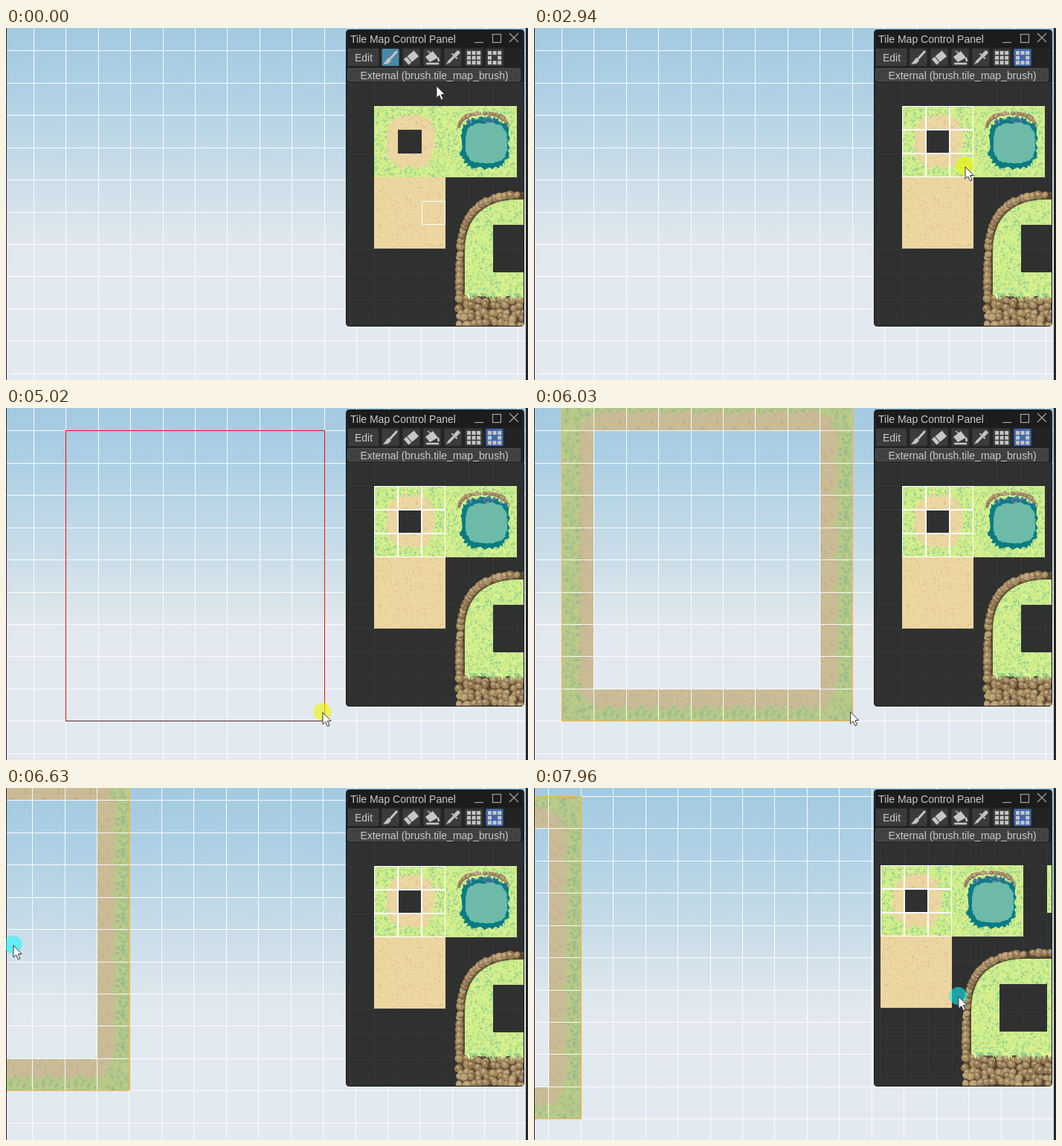
Recreate the animation shown at these times as an HTML page with a canvas. Size 702 by 474 pixels, loop 8000 ms.

```html
<!DOCTYPE html>
<html lang="en">
<head>
<meta charset="utf-8">
<title>Tile Map Control Panel</title>
<style>
html, body { margin: 0; width: 100%; height: 100%; overflow: hidden; background: #262626; }
canvas { display: block; }
</style>
</head>
<body>
<canvas id="stage" width="702" height="474"></canvas>
<script>
const LOOP = 8000, W = 702, H = 474, TILE = 32, SET = TILE * 3;
const CELL = 43.45, COLS = 9, ROWS = 10;
const GRID = { x: 37.2, y: 30.75 }, PALETTE = { x: 495, y: 105 };
const PICK_RING = 1140, DRAW_START = 3820, DRAW_END = 5360;
const ctx = document.getElementById('stage').getContext('2d');

let seed = 7;
const rand = () => (seed = (seed * 16807) % 2147483647) / 2147483647;
const between = (a, b) => a + (b - a) * rand();
const pick = list => list[Math.floor(rand() * list.length)];

const GRASS = {
  base: '#d3ee8b', density: .13, length: 5, turn: 6.3,
  shades: ['#a6dc92', '#9bd58f', '#8bcb8c', '#bde58c', '#def392', '#e0f594']
};
const DIRT = {
  base: '#ecd6a2', density: .11, length: 3, turn: .9,
  shades: ['#e0c590', '#f2e0b2', '#e4cb97', '#d3b581', '#f0dca9']
};
const CLIFF_ROCK = ['#a68c62', '#b69d72', '#937a54', '#9c8260'];
const POND_ROCK = ['#b69a76', '#a58662', '#c4ab88'];

function layer(w, h) {
  const canvas = document.createElement('canvas');
  canvas.width = Math.ceil(w);
  canvas.height = Math.ceil(h);
  return canvas;
}

function box(g, color, x, y, w, h) {
  g.fillStyle = color;
  g.fillRect(x, y, w, h);
}

function polygon(g, points, dx = 0, dy = 0) {
  g.beginPath();
  points.forEach(([x, y]) => g.lineTo(x + dx, y + dy));
  g.closePath();
}

function clipped(g, draw) {
  g.save();
  g.clip();
  draw();
  g.restore();
}

// Fills a rectangle with randomly turned flecks that stay inside it.
function ground(g, kind, x, y, w, h) {
  g.beginPath();
  g.rect(x, y, w, h);
  clipped(g, () => {
    box(g, kind.base, x, y, w, h);
    for (let i = 0; i < w * h * kind.density; i++) {
      const a = between(0, kind.turn), l = between(.4, 1) * kind.length;
      g.fillStyle = pick(kind.shades);
      polygon(g, [[0, 0], [l * Math.cos(a), l * Math.sin(a)], [l * Math.cos(a + .6), l * Math.sin(a + .6)]],
        between(x, x + w), between(y, y + h));
      g.fill();
    }
  });
}

const bend = (v, power) => Math.sign(v) * Math.abs(v) ** power;
const rounded = (cx, cy, rx, ry, a, power = .65) =>
  [cx + rx * bend(Math.cos(a), power), cy + ry * bend(Math.sin(a), power)];

function blob(g, cx, cy, rx, ry, jag) {
  const points = Array.from({ length: 80 }, (_, i) => {
    const k = 1 - rand() * jag;
    return rounded(cx, cy, rx * k, ry * k, i / 80 * Math.PI * 2);
  });
  polygon(g, points);
}

function rock(g, shades, x, y, r) {
  const part = (color, dx, dy, rx, ry) => {
    g.beginPath();
    g.ellipse(x + dx * r, y + dy * r, rx * r, ry * r, between(0, 3), 0, 7);
    g.fillStyle = color;
    g.fill();
  };
  part('#6f5a40', 0, 0, 1, .9);
  part(pick(shades), -.1, -.1, .9, .75);
  part('#c6ad82', -.2, -.3, .4, .25);
}

function drawDirtRing(g) {
  ground(g, GRASS, 0, 0, SET, SET);
  blob(g, 49, 48, 35, 39, .2);
  clipped(g, () => ground(g, DIRT, 0, 0, SET, SET));
  g.clearRect(TILE, TILE, TILE, TILE);
}

function drawPond(g) {
  ground(g, GRASS, SET, 0, SET, SET);
  for (let a = 3.3; a < 6.1; a += .12) rock(g, POND_ROCK, ...rounded(147, 33, 33, 23, a, .8), between(2, 3.4));
  g.fillStyle = '#087c83';
  blob(g, 149, 50, 35, 37, .14);
  g.fill();
  clipped(g, () => {
    for (let i = 0; i < 70; i++) {
      box(g, pick(['#4f7fa4', '#35698c', '#6e86a8']), between(115, 176), between(13, 23), 3, 2);
    }
  });
  g.fillStyle = '#6ebaa8';
  blob(g, 151, 50, 29, 28, .07);
  g.fill();
}

function drawCliff(g) {
  const shoulder = inset => {
    const points = [[112 + inset, 300]];
    for (let a = Math.PI; a < Math.PI * 1.5; a += .08) {
      points.push(rounded(200, 200, 88 - inset, 84 - inset, a, .8));
    }
    return [...points, [240, 116 + inset], [240, 300]];
  };
  polygon(g, shoulder(0));
  g.fillStyle = '#57472f';
  g.fill();
  for (let y = 205; y < 256; y += 8) rock(g, CLIFF_ROCK, 115, y, between(5, 7));
  shoulder(4).slice(1, -1).forEach(([x, y]) => rock(g, CLIFF_ROCK, x, y, between(4.5, 7)));
  for (let x = 205; x < 240; x += 8) rock(g, CLIFF_ROCK, x, 118, between(4.5, 7));
  polygon(g, shoulder(10));
  clipped(g, () => ground(g, GRASS, 112, 112, 128, 144));
  for (let y = 262; y < 302; y += 8) {
    for (let x = 115; x < 240; x += 9) {
      rock(g, CLIFF_ROCK, x + between(-3, 3), y + between(-3, 3), between(4.5, 7));
    }
  }
  for (let x = 124; x < 240; x += 3) {
    g.fillStyle = pick(GRASS.shades);
    polygon(g, [[-3, 0], [4, 0], [1, between(4, 11)]], x, 252);
    g.fill();
  }
  g.clearRect(TILE * 5, TILE * 5, TILE * 2, TILE * 2);
}

const tiles = layer(240, 302);
{
  const g = tiles.getContext('2d');
  drawCliff(g);
  drawDirtRing(g);
  drawPond(g);
  ground(g, DIRT, 0, SET, SET, SET);
  ground(g, GRASS, TILE * 7, 0, 16, TILE * 2);
}

// The painted frame repeats the ring's edge tiles around an open middle.
const painted = layer(COLS * CELL, ROWS * CELL);
{
  const g = painted.getContext('2d');
  const part = (i, n) => i === 0 ? 0 : i === n - 1 ? 2 : 1;
  for (let c = 0; c < COLS; c++) {
    for (let r = 0; r < ROWS; r++) {
      g.drawImage(tiles, part(c, COLS) * TILE, part(r, ROWS) * TILE, TILE, TILE,
        c * CELL, r * CELL, CELL + .5, CELL + .5);
    }
  }
  g.clearRect(CELL, CELL, (COLS - 2) * CELL, (ROWS - 2) * CELL);
  g.globalCompositeOperation = 'source-atop';
  box(g, 'rgba(150,150,135,.4)', 0, 0, painted.width, painted.height);
}

// Each move: start, end, destination, and the button held until the next move.
const HOME = [579, 78];
const moves = [
  [70, 610, 659, 42],
  [870, 1000, 655, 43, 'left'],
  [1140, 1400, 690, 61],
  [1670, 2270, 503, 114],
  [2410, 2940, 580, 187, 'left'],
  [3080, 3550, 97, 36],
  [3820, 4620, 386, 317, 'left'],
  [4690, 5020, 426, 410, 'left'],
  [5360, 5430, 426, 410],
  [6030, 6230, 334, 226],
  [6230, 6360, 271, 220, 'middle'],
  [6360, 6630, 10, 212, 'middle'],
  [6830, 7030, 298, 254],
  [7030, 7230, 258, 291, 'middle'],
  [7330, 7700, 600, 282],
  [7740, 7960, 571, 281, 'middle']
];
const pans = [
  [6230, 6360, -63.2, -5],
  [6360, 6630, -262, -14],
  [6630, 6830, -323, -14],
  [7030, 7230, -362.7, 24],
  [7230, 7330, -365, 24]
];
const palettePans = [[7740, 7960, -29, -1]];

function follow(steps, t, [x, y]) {
  let button;
  for (const [start, end, toX, toY, held] of steps) {
    if (t < start) break;
    const k = Math.min(1, (t - start) / (end - start));
    x += (toX - x) * k;
    y += (toY - y) * k;
    button = held;
  }
  return { x, y, button };
}

const sky = ctx.createLinearGradient(0, 0, 0, H);
[[0, '#a3cae1'], [.16, '#add0e4'], [.4, '#c8dce8'], [.63, '#e2e9ee'], [1, '#e2e9f1']]
  .forEach(([at, color]) => sky.addColorStop(at, color));

function outline(x, y, w, h, color, bottom = color) {
  const [l, t, r, b] = [x, y, x + w, y + h].map(Math.floor);
  box(ctx, color, l, t, r - l, 1);
  box(ctx, bottom, l, b, r - l, 1);
  box(ctx, color, l, t, 1, b - t);
  box(ctx, color, r, t, 1, b - t + 1);
}

function drawGrid(dx, dy) {
  const first = v => (v % CELL + CELL) % CELL;
  const white = 'rgba(255,255,255,.9)';
  for (let x = first(GRID.x + dx); x < W; x += CELL) box(ctx, white, Math.floor(x), 0, 1, H);
  for (let y = first(GRID.y + dy); y < H; y += CELL) box(ctx, white, 0, Math.floor(y), W, 1);
}

function drawScene(t, cursor) {
  const pan = follow(pans, t, [0, 0]);
  const left = GRID.x + pan.x, top = GRID.y - CELL + pan.y;
  const done = t >= DRAW_END;
  box(ctx, sky, 0, 0, W, H);
  if (done) ctx.drawImage(painted, left, top);
  drawGrid(pan.x, pan.y);
  if (done) outline(left, top, COLS * CELL, ROWS * CELL, '#fbb03c');
  if (t >= DRAW_START && !done) {
    const x = GRID.x + CELL, y = GRID.y;
    const snap = v => Math.round(v / CELL) * CELL;
    outline(x, y, snap(cursor.x - x), snap(cursor.y - y), '#ff0a0a', '#54272d');
  }
  box(ctx, '#262626', 0, 0, 1, H);
  box(ctx, '#262626', 699, 0, 3, H);
}

function plate(color, x, y, w, h, r, edge) {
  ctx.beginPath();
  ctx.roundRect(x, y, w, h, r);
  ctx.fillStyle = color;
  ctx.fill();
  ctx.strokeStyle = edge;
  ctx.lineWidth = 1;
  ctx.stroke();
}

function line(width, x1, y1, x2, y2) {
  ctx.lineWidth = width;
  ctx.beginPath();
  ctx.moveTo(x1, y1);
  ctx.lineTo(x2, y2);
  ctx.stroke();
}

function squares(hollow) {
  for (let i = 0; i < 9; i++) {
    if (!hollow || i !== 4) ctx.fillRect(-9 + i % 3 * 6.6, -9 + Math.floor(i / 3) * 6.6, 5, 5);
  }
}

// Icons are drawn around their own centre.
const icons = [
  function brush() {
    line(3, 9, -9, -1, 2);
    polygon(ctx, [[-3, 0], [1, 4], [-3, 8], [-10, 9]]);
    ctx.fill();
  },
  function eraser() {
    ctx.rotate(-.7);
    ctx.fillRect(-3, -5, 12, 10);
    ctx.fillRect(-9, -5, 5, 10);
  },
  function bucket() {
    polygon(ctx, [[-9, -1], [1, -9], [8, 0], [-3, 6]]);
    ctx.fill();
    line(1.5, -6, -9, 1, -4);
    line(2.5, 8, 0, 9, 5);
    line(2.5, -8, 8, 9, 8);
  },
  function picker() {
    ctx.rotate(-.8);
    ctx.fillRect(4, -2.5, 8, 5);
    ctx.fillRect(2, -5, 2, 10);
    ctx.fillRect(-9, -1.7, 11, 3.4);
    ctx.fillRect(-12, -.7, 4, 1.4);
  },
  () => squares(false),
  () => squares(true)
];

function label(text, x, y, align) {
  ctx.font = '14px "Liberation Sans", sans-serif';
  ctx.textAlign = align;
  ctx.fillStyle = '#cacaca';
  ctx.fillText(text, x, y);
}

function drawSelection(t, cursor) {
  const [, dragEnd] = moves[4];
  ctx.strokeStyle = '#fff';
  ctx.lineWidth = 1;
  const cell = (c, r) => ctx.strokeRect(c * TILE + .5, r * TILE + .5, TILE - 1, TILE - 1);
  if (t < moves[4][0]) return cell(2, 4);
  const reach = v => t >= dragEnd ? 3 : Math.min(3, Math.max(1, Math.ceil(v / TILE)));
  for (let c = 0; c < reach(cursor.x - PALETTE.x); c++) {
    for (let r = 0; r < reach(cursor.y - PALETTE.y); r++) cell(c, r);
  }
}

function drawPalette(t, cursor) {
  const pan = follow(palettePans, t, [0, 0]);
  ctx.beginPath();
  ctx.rect(458, 74, 238, 327);
  clipped(ctx, () => {
    ctx.translate(Math.round(PALETTE.x + pan.x), Math.round(PALETTE.y + pan.y));
    for (let i = -1; i < 10; i++) {
      box(ctx, '#363737', i * TILE, -40, 1, 350);
      box(ctx, '#363737', -40, i * TILE, 290, 1);
    }
    ctx.drawImage(tiles, 0, 0);
    drawSelection(t, cursor);
  });
}

function drawPanel(t, cursor) {
  plate('#2f3030', 457.5, 2.5, 239, 399, 4, '#151515');
  box(ctx, '#1c1c1c', 459, 3, 236, 23);
  box(ctx, '#222323', 458, 26, 238, 47);
  label('Tile Map Control Panel', 463, 20, 'left');
  ctx.strokeStyle = '#a2a2a2';
  line(1.2, 630, 19.5, 642, 19.5);
  ctx.strokeRect(654.5, 8.5, 11, 11);
  line(1.2, 677, 7, 689, 19);
  line(1.2, 689, 7, 677, 19);

  plate('#3a3b3b', 459.5, 27.5, 42, 24, 2, '#2a2a2a');
  label('Edit', 481, 45, 'center');
  const active = t < PICK_RING ? 0 : 5;
  icons.forEach((icon, i) => {
    const x = 517 + i * 28, color = i !== active ? '#3a3b3b' : i ? '#4069ae' : '#4788a8';
    plate(color, x - 12, 27.5, 24, 24, 2, '#2a2a2a');
    ctx.save();
    ctx.translate(x, 40);
    ctx.fillStyle = ctx.strokeStyle = '#c6c6c6';
    icon();
    ctx.restore();
  });
  plate('#404141', 459.5, 54.5, 232, 17, 2, '#505151');
  label('External (brush.tile_map_brush)', 576, 69, 'center');
  drawPalette(t, cursor);
}

const arrow = [[0, 0], [0, 16], [3.7, 12.7], [6.4, 18.8], [9, 17.6], [6.3, 11.7], [11, 11.4]];
const pressColor = { left: 'rgba(240,245,0,.6)', middle: 'rgba(20,248,255,.57)' };

function drawCursor({ x, y, button }) {
  if (button) {
    ctx.beginPath();
    ctx.arc(x - .5, y - 1, 12, 0, 7);
    ctx.fillStyle = pressColor[button];
    ctx.fill();
  }
  polygon(ctx, arrow, x, y);
  ctx.fillStyle = '#fff';
  ctx.fill();
  ctx.strokeStyle = '#333';
  ctx.lineWidth = 1;
  ctx.stroke();
}

function frame(now) {
  const t = now % LOOP, cursor = follow(moves, t, HOME);
  drawScene(t, cursor);
  drawPanel(t, cursor);
  drawCursor(cursor);
  requestAnimationFrame(frame);
}
frame(0);
</script>
</body>
</html>
```
